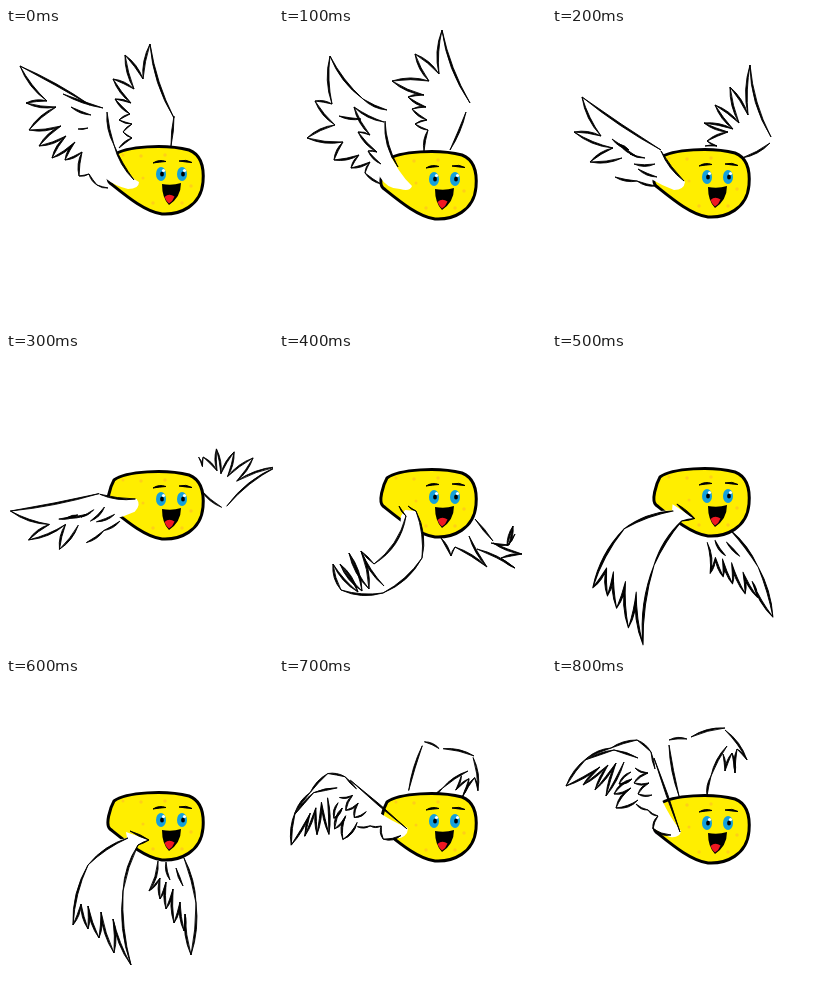
Recreate the animation shown at these times as an HTML page. Size 267 by 297 pixels, loop 0.9 s.

```html
<!DOCTYPE html>
<html lang="en">
<head>
<meta charset="utf-8">
<title>Flying potato</title>
<style>
  html, body { margin: 0; height: 100%; overflow: hidden; background: #fff; }
  svg { display: block; width: 100vw; height: 100vh; }
  .pose { visibility: hidden; animation: flap .9s step-end infinite; }
  .ink { fill: #000; stroke: #000; stroke-width: .9; stroke-linejoin: round; }
  .root { fill: #fff; }
  @keyframes flap {
    0% { visibility: visible; }
    11.1111%, 100% { visibility: hidden; }
  }
</style>
</head>
<body>
<svg id="stage" viewBox="0 0 267 297">
  <defs>
    <g id="potato">
      <path fill="#ffee00" stroke="#000" stroke-width="3" stroke-linejoin="round"
        d="M108 127C120 118 160 116 183 122C196 127 198 142 197 154C195 178 174 187 156 186C139 184 119 167 104 155C99 151 104 134 108 127Z"/>
      <g fill="#ffcf18">
        <circle cx="159" cy="127" r="1.7"/><circle cx="135" cy="128" r="1.7"/>
        <circle cx="117" cy="127" r="1.5"/><circle cx="137" cy="150" r="1.5"/>
        <circle cx="147" cy="175" r="1.7"/><circle cx="176" cy="175" r="1.7"/>
        <circle cx="185" cy="158" r="1.7"/>
      </g>
      <path d="M147 135Q153 131 160 133.5Q153 134 147 135ZM173 133Q180 131 186 134.5Q179 134 173 133Z" stroke="#000"/>
      <g id="eye">
        <ellipse cx="155" cy="146" rx="5" ry="7" fill="#159fdb"/>
        <ellipse cx="156" cy="146" rx="1.9" ry="2.6"/>
        <circle cx="157.5" cy="142.5" r="1.6" fill="#fff"/>
      </g>
      <use href="#eye" x="21"/>
      <path d="M156 156Q166 158 175 155Q175 169 163 177Q156 170 156 156Z"/>
      <path fill="#f01822" d="M158.5 169Q163 165 168.5 168.5Q167 173 163 175.5Q160 173 158.5 169Z"/>
    </g>
  </defs>
</svg>
<script>
const svgNS = "http://www.w3.org/2000/svg";
const stage = document.getElementById("stage");
const steps = 9;

function add(parent, tag, attrs) {
  const node = parent.appendChild(document.createElementNS(svgNS, tag));
  for (const key in attrs) node.setAttribute(key, attrs[key]);
  return node;
}

// A chain is "bend x y x y ...": every link bows by bend and tapers like a brush mark.
function brush(chain) {
  const [bend, ...n] = chain.split(" ").map(Number);
  let d = "";
  for (let i = 0; i + 3 < n.length; i += 2) {
    const [x, y, ex, ey] = n.slice(i, i + 4);
    const dx = ex - x, dy = ey - y;
    const length = Math.hypot(dx, dy);
    const swell = Math.min(1.7, length / 12) / length;
    const via = k => `${(x + ex) / 2 - dy * k} ${(y + ey) / 2 + dx * k}`;
    d += `M${x} ${y}Q${via(bend + swell)} ${ex} ${ey}Q${via(bend - swell)} ${x} ${y}Z`;
  }
  return d;
}

const wing = (root, ...chains) => ({ root, ink: chains.map(brush).join("") });

// The same wing swung around its shoulder.
const swing = (shape, angle, x, y, scale) => ({
  ...shape,
  transform: `translate(${x} ${y}) rotate(${angle}) scale(${scale}) translate(${-x} ${-y})`
});

function drawWing(parent, { root, ink, transform = "" }) {
  const group = add(parent, "g", { transform });
  add(group, "path", { class: "root", d: root });
  add(group, "path", { class: "ink", d: ink });
}

function pose(step, dy, back, front) {
  const group = add(stage, "g", { class: "pose" });
  group.style.animationDelay = `${(step - steps) * 100}ms`;
  drawWing(group, back);
  add(group, "use", { href: "#potato", y: dy });
  drawWing(group, front);
}

const raisedBack = wing("",
  "-.1 168 90 144 16",
  ".1 144 16 137 51 119 27 128 61 107 51 125 75 109 71 124 86 113 92 126 96 117 104 126 110 113 120",
  "0 168 88 165 118");
const raisedFront = wing("M99 100L110 122Q120 148 133 154Q133 161 122 161Q109 158 99 150Z",
  "-.05 97 80 57 66",
  ".03 84 77 14 38",
  ".12 14 38 41 73 20 75 50 79 23 102 55 98 33 118 60 108 46 130 69 114 59 132 76 124 73 148 83 146 91 157 102 160",
  ".1 101 84 108 117 128 152",
  ".1 65 79 85 87",
  ".1 72 101 82 100");

const spreadBack = wing("",
  ".1 163 2 191 75",
  ".12 163 2 160 46 136 26 150 53 113 53 145 67 129 69 147 79 133 81 148 92 136 96 149 102 145 123",
  "-.05 187 84 171 122");
const spreadFront = wing("M98 112L108 120Q119 145 133 158Q131 164 121 161Q108 161 101 149Z",
  ".12 51 28 84 71 108 82",
  ".12 51 28 53 76 36 73 56 97 28 110 64 114 55 132 80 127 72 140 91 134 86 145 102 156",
  ".1 60 88 82 91",
  ".12 75 79 105 94",
  ".12 75 79 91 107 79 104 98 124 89 123 102 136",
  ".15 106 93 119 139");

const levelBack = wing("",
  ".12 198 37 219 109",
  "-.12 218 115 190 130",
  ".1 198 37 196 87 178 59 187 95 163 77 181 101 152 95 176 104 155 113 165 118 153 118");
const levelFront = wing("M94 116L109 124Q122 144 133 154Q132 162 122 162Q109 157 99 151Z",
  ".03 30 69 109 122",
  ".12 30 69 49 108 22 104 61 120 38 134 70 130",
  ".1 60 111 77 122 67 116 84 128 78 126 93 130",
  ".15 82 136 103 136",
  ".12 86 141 105 149",
  ".12 63 149 85 153 104 158",
  ".1 109 123 132 153");

const loweredBack = wing("",
  "0 196 166 214 188",
  ".08 212 190 230 192 234 173 228 193 236 181",
  ".08 214 190 243 201 222 205 236 215 198 196",
  ".08 190 183 208 214 176 194 172 203 162 185");
const loweredFront = wing("M126 157L137 158Q148 182 144 204L113 194Q122 178 122 163Z",
  "-.2 127 163 95 211",
  "-.15 137 158 143 205 104 240 62 237 54 211",
  ".12 54 211 79 239 61 211 83 238 70 200 90 236 82 198 105 233",
  "0 82 198 95 211",
  ".1 120 153 127 163",
  ".1 129 153 137 158");

const hangingBack = wing("",
  "-.15 152 183 143 213",
  ".1 143 213 154 200 154 221 160 204 160 231 167 211 168 245 174 224 178 253 179 236 185 277",
  "-.08 178 180 190 225 185 277",
  ".15 160 184 164 202",
  ".05 170 190 177 208");
const hangingFront = wing("M120 154L143 162L132 167Q117 190 116 218L80 208Q94 163 121 160Z",
  ".12 122 160 82 187 67 247",
  "0 124 153 143 162 132 167",
  ".1 132 167 117 213 125 287",
  ".1 67 247 75 226 82 251 82 228 93 260 95 234 108 275 107 241 125 287");

const bentBack = wing("",
  "-.15 117 62 135 61",
  ".05 117 67 127 118",
  "-.12 139 59 173 50",
  "-.12 173 52 195 82",
  ".1 195 82 185 71 183 95 180 75 173 93 171 76",
  ".1 175 68 159 98 155 118");
const bentFront = wing("M98 104L109 120Q118 140 129 153Q128 160 118 159Q107 155 98 147Z",
  "-.1 14 108 35 80 59 70 85 62 99 74",
  ".06 14 108 48 89 31 107 56 87 43 112 64 85 54 118 72 84",
  "-.05 33 82 62 72 86 80",
  ".2 79 94 67 106 80 101 62 116 79 110 64 130 86 122",
  ".2 83 90 96 95 82 105 97 105 86 116 100 117",
  ".2 84 126 96 132 106 138 101 151 119 157",
  "0 99 74 103 91",
  "0 102 80 128 154");

pose(0, 0, raisedBack, raisedFront);
pose(1, 5, spreadBack, spreadFront);
pose(2, 3, levelBack, levelFront);
pose(3, 0, swing(levelBack, 68, 188, 138, .85), swing(levelFront, -45, 122, 152, .95));
pose(4, -2, loweredBack, loweredFront);
pose(5, -3, swing(hangingBack, -22, 170, 178, 1), swing(hangingFront, 14, 130, 158, 1.08));
pose(6, -4, hangingBack, hangingFront);
pose(7, -3, swing(bentBack, 28, 140, 118, .9), swing(bentFront, -30, 122, 152, .95));
pose(8, -1, bentBack, bentFront);
</script>
</body>
</html>
```
